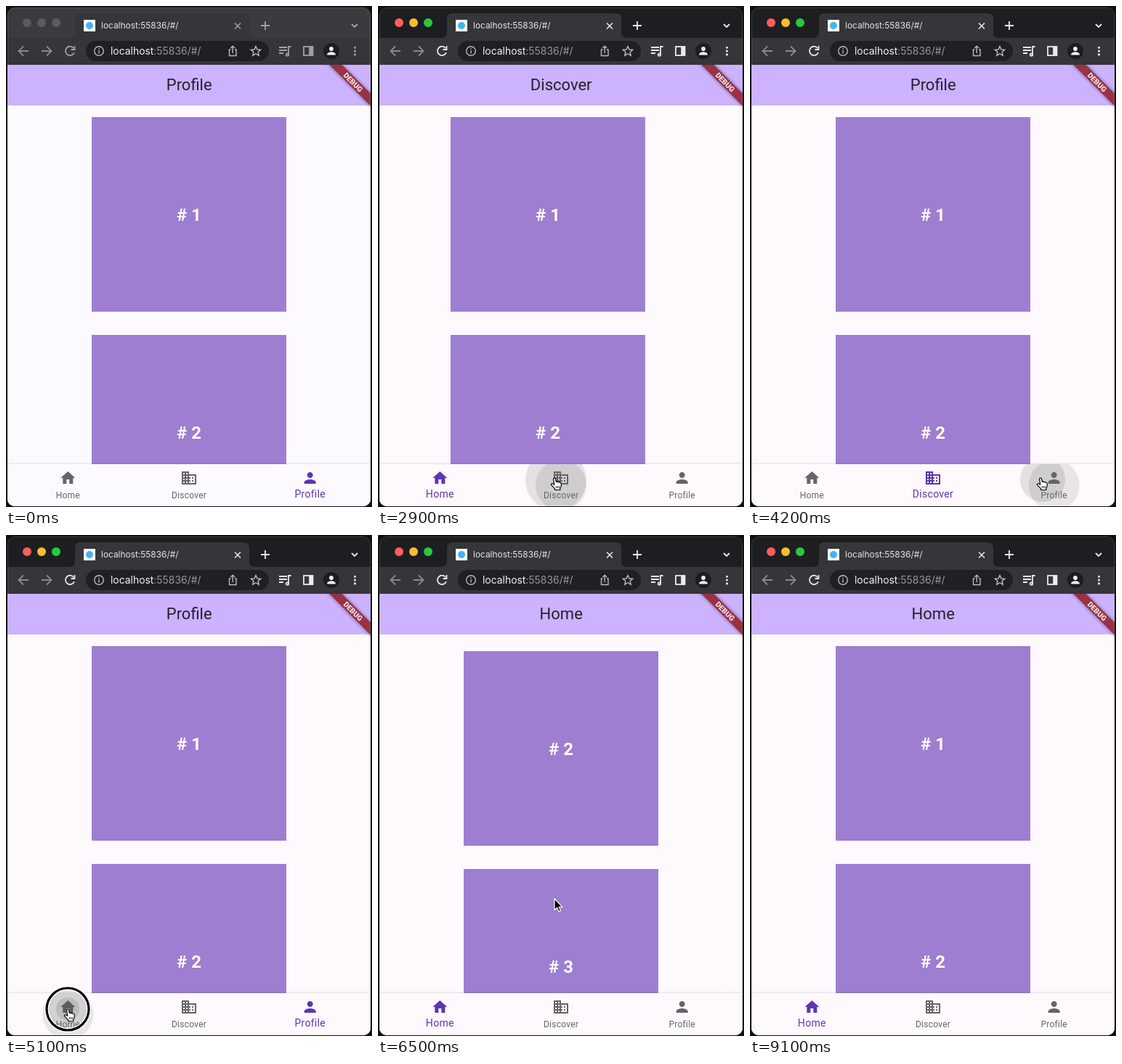
These frames come from a looping animation (504 by 690 pixels, 10 s). An HTML page:

```html
<!DOCTYPE html>
<html lang="en">
<head>
<meta charset="utf-8">
<title>Tabs demo</title>
<style>
html, body { margin: 0; width: 100%; height: 100%; overflow: hidden; background: #101113; }
svg { display: block; width: 504px; height: 690px; }
text { font-family: Roboto, sans-serif; white-space: pre; }
.ui { font-family: Inter, sans-serif; }
.mid { text-anchor: middle; }
.line { fill: none; stroke-width: 1.8; }
</style>
</head>
<body>
<svg viewBox="0 0 504 690" xmlns="http://www.w3.org/2000/svg">
  <defs>
    <clipPath id="win"><rect x="2" y="2" width="500" height="687" rx="10"/></clipPath>
    <clipPath id="body"><rect x="2" y="137" width="500" height="494"/></clipPath>
    <clipPath id="bar"><rect x="2" y="631" width="500" height="58"/></clipPath>
    <clipPath id="app"><rect x="2" y="81" width="500" height="608"/></clipPath>
    <filter id="blur" x="-30%" y="-100%" width="160%" height="300%"><feGaussianBlur stdDeviation="2.6"/></filter>
    <linearGradient id="edge" x1="0" y1="0" x2="0" y2="1">
      <stop offset="0" stop-color="#000" stop-opacity="0"/>
      <stop offset="1" stop-color="#000" stop-opacity=".09"/>
    </linearGradient>
  </defs>
  <g clip-path="url(#win)">
    <rect id="strip" width="504" height="50"/>
    <rect y="44" width="504" height="37" fill="#35353a"/>
    <path d="M87 44q8 0 8-8V18q0-8 8-8H327q8 0 8 8V36q0 8 8 8z" fill="#35353a"/>
    <g id="lights"><circle cx="29" cy="23" r="6"/><circle cx="49" cy="23" r="6"/><circle cx="69" cy="23" r="6"/></g>
    <rect x="107" y="19" width="16" height="16" fill="#fff"/>
    <circle cx="115" cy="27" r="5" fill="#42b4ee"/>
    <text class="ui" x="131" y="31" font-size="11.9" fill="#e6e6e8">localhost:55836/#/</text>
    <rect x="110" y="48" width="252" height="28" rx="14" fill="#1f2024"/>
    <text class="ui" x="144" y="67" font-size="13.9" fill="#f2f2f4">localhost<tspan fill="#97979b">:55836/#/</tspan></text>
    <g class="line" stroke="#89898d">
      <path d="M31 62H18M24 55.5L17.5 62L24 68.5"/>
      <path id="fwd" d="M49 62H62M56 55.5L62.500 62L56 68.5"/>
    </g>
    <g class="line" id="icons">
      <path d="M93 58A6.200 6.200 0 1 0 94 64M94.500 55V60H89.500"/>
      <path d="M315 23.500L323 31.500M323 23.500L315 31.500" stroke-width="1.5"/>
      <path d="M351 27H363M357 21V33"/>
      <path d="M476 25L480 29L484 25"/>
      <path d="M376 57H387M376 61H387M376 65H382M389 67V56H392.500"/>
      <circle cx="387.500" cy="67" r="1.700"/>
      <rect x="410" y="56" width="12.500" height="12"/>
      <path d="M419.700 56V68" stroke-width="5"/>
      <path d="M480.500 57.200V57.300M480.500 62V62.100M480.500 66.800V66.900" stroke-width="3" stroke-linecap="round"/>
    </g>
    <g class="line" stroke="#b9b9bd" style="stroke-width:1.4">
      <circle cx="128" cy="62" r="6.300"/><path d="M128 61V65.500M128 58.300V59.800"/>
      <path d="M309.500 60H307.500V68.500H317V60H315M312.200 65V55.500M309.300 58L312.200 55.200L315.100 58"/>
      <path d="M344 55.500L346 60L350.700 60.400L347.100 63.500L348.200 68.200L344 65.700L339.800 68.200L340.900 63.500L337.300 60.400L342 60Z"/>
    </g>
    <circle cx="448" cy="62" r="11" fill="#1c1d20"/>
    <circle cx="448" cy="59" r="2.900" fill="#f0f0f2"/>
    <path d="M442.300 67.500v-1.300c0-2 3.800-3 5.700-3s5.700 1 5.700 3v1.300z" fill="#f0f0f2"/>

    <g clip-path="url(#app)">
      <rect id="page" y="81" width="504" height="609"/>
      <g clip-path="url(#body)" id="pages"></g>
      <rect x="2" y="81" width="500" height="56" fill="#ccb2ff"/>
      <text id="title" class="mid" x="252.200" y="116" font-size="22" fill="#25212c"></text>
      <rect x="2" y="628" width="500" height="3" fill="url(#edge)"/>
      <rect id="navBg" x="2" y="631" width="500" height="58"/>
      <g clip-path="url(#bar)">
        <circle id="splash" fill="#000"/>
        <g id="hovers"></g>
        <g id="nav"></g>
      </g>
      <g transform="translate(502 81) rotate(45)">
        <rect x="-50" y="28" width="100" height="12" fill="#000" opacity=".5" filter="url(#blur)"/>
        <rect x="-50" y="28" width="100" height="12" fill="#9a3145"/>
        <text class="mid" x="0" y="37.600" font-size="10.2" font-weight="900" fill="#f3e6ea">DEBUG</text>
      </g>
    </g>
    <rect x="2.500" y="2.500" width="499" height="686" rx="9.500" fill="none" stroke="#fff" stroke-opacity=".14"/>
  </g>
  <g id="ring">
    <circle r="29" fill="#000" fill-opacity=".09" stroke="#fff" stroke-width="6"/>
    <circle r="29" fill="none" stroke="#000" stroke-width="3.200"/>
  </g>
  <g id="cursor" stroke-linejoin="round">
    <path id="arrow" d="M0 0V15.500L3.600 12.200L6 17.600L8.500 16.500L6.200 11.300H11Z" fill="#000" stroke="#fff" stroke-width="1.200"/>
    <g id="hand">
      <path d="M-1.500 1Q0-1 1.400 1L2.600 5.500Q4 4.300 5 5.800Q6.400 4.900 7.300 6.500Q9 6 9.300 8L9.200 11.500L7.800 14V16.500H.6V14.800L-4.600 9.400Q-4.600 7.500-2.600 7.800L-.3 9.300Z" fill="#fff" stroke="#000" stroke-width="1.200"/>
      <path d="M2.300 11V14M4.300 11V14M6.300 11V14" stroke="#000" stroke-width=".8"/>
    </g>
  </g>
</svg>
<script>
const LOOP = 10000, SLIDE = 450;
const $ = id => document.getElementById(id);
const names = ['Home', 'Discover', 'Profile'];
const centers = [85.3, 252, 418.7];
const glyphs = [
  'M10 20v-6h4v6h5v-8h3L12 3 2 12h3v8z',
  'M12 7V3H2v18h20V7H12zM6 19H4v-2h2v2zm0-4H4v-2h2v2zm0-4H4V9h2v2zm0-4H4V5h2v2zm4 12H8v-2h2v2zm0-4H8v-2h2v2zm0-4H8V9h2v2zm0-4H8V5h2v2zm10 12h-8v-2h2v-2h-2v-2h2v-2h-2V9h8v10zm-2-8h-2v2h2v-2zm0 4h-2v2h2v-2z',
  'M12 12c2.210 0 4-1.790 4-4s-1.790-4-4-4-4 1.790-4 4 1.790 4 4 4zm0 2c-2.670 0-8 1.340-8 4v2h16v-2c0-2.660-5.330-4-8-4z'
];

// tap: pointer down, slide start, target tab, touch point
const taps = [
  { down: 1890, slide: 1930, to: 0, x: 83.5, y: 653 },
  { down: 2375, slide: 2495, to: 1, x: 245, y: 653 },
  { down: 3812, slide: 3850, to: 2, x: 403, y: 652 },
  { down: 4900, slide: 4950, to: 0, x: 85, y: 653 }
];
// pointer path: time, x, y
const path = [
  [100, 503, 400], [1100, 87, 657], [1500, 84, 653], [1950, 84, 653],
  [2370, 245, 653], [2900, 243, 650], [3250, 243, 650], [3800, 403, 652],
  [4200, 400, 650], [4400, 400, 650], [4880, 85, 653], [5200, 85, 653],
  [5780, 243, 501], [7200, 243, 501], [7500, 244, 501], [8600, 244, 501], [9050, 503, 470]
];
// list scrolling: start, end, from, to
const flicks = [
  [5840, 6500, 0, 293], [6850, 7200, 293, 530],
  [7350, 8100, 530, 285], [8450, 9060, 285, 0]
];

const clamp = (v, a = 0, b = 1) => Math.min(b, Math.max(a, v));
const mix = (a, b, p) => a + (b - a) * p;
const smooth = p => p * p * (3 - 2 * p);
const flickEase = p => 1 - (1 - smooth(p)) ** 2;

function backEase(p) {
  const c = 2.595;
  if (p < .5) return (2 * p) ** 2 * ((c + 1) * 2 * p - c) / 2;
  const x = 2 * p - 2;
  return (x * x * ((c + 1) * x + c) + 2) / 2;
}

function make(tag, parent, attrs) {
  const el = document.createElementNS('http://www.w3.org/2000/svg', tag);
  set(el, attrs);
  parent.append(el);
  return el;
}
function set(el, attrs) {
  for (const k in attrs) el.setAttribute(k, attrs[k]);
}
const show = (el, on) => el.setAttribute('visibility', on ? 'visible' : 'hidden');

const pages = names.map(() => {
  const g = make('g', $('pages'), {});
  for (let i = 0; i < 5; i++) {
    make('rect', g, { x: 118, y: 153 + 300 * i, width: 268, height: 268, fill: '#9d7ed0' });
    make('text', g, { x: 252, y: 295.5 + 300 * i, class: 'mid', 'font-size': 24, 'font-weight': 700, fill: '#fff' })
      .textContent = '# ' + (i + 1);
  }
  return g;
});
const hovers = centers.map(x => make('circle', $('hovers'), { cx: x, cy: 660, r: 35, fill: '#000' }));
const tabs = names.map((name, i) => {
  const g = make('g', $('nav'), {});
  make('path', g, { d: glyphs[i], transform: `translate(${centers[i] - 12} 638)` });
  const label = make('text', g, { x: centers[i], class: 'mid' });
  label.textContent = name;
  return { g, label };
});

function pageAt(t) {
  let page = 2;
  for (const tap of taps) {
    if (t < tap.slide) break;
    page = clamp(mix(page, tap.to, backEase(clamp((t - tap.slide) / SLIDE))), 0, 2);
  }
  return page;
}

function scrollAt(t) {
  let y = 0;
  for (const [a, b, from, to] of flicks)
    if (t >= a) y = mix(from, to, flickEase(clamp((t - a) / (b - a))));
  return y;
}

function pointerAt(t) {
  let i = 0;
  while (i < path.length - 2 && t >= path[i + 1][0]) i++;
  const [a, x0, y0] = path[i], [b, x1, y1] = path[i + 1];
  const p = smooth(clamp((t - a) / (b - a)));
  return [mix(x0, x1, p), mix(y0, y1, p)];
}

// selected amount of a tab, fading over 200 ms after each slide ends
function chosen(i, t) {
  let now = 2, before = 2, since = -1e4;
  for (const tap of taps) {
    const end = tap.slide + SLIDE;
    if (t >= end) { before = now; now = tap.to; since = end; }
  }
  const p = smooth(clamp((t - since) / 200));
  return (now === i ? p : 0) + (before === i ? 1 - p : 0);
}

function drawChrome(t) {
  const active = t >= 1250;
  $('strip').setAttribute('fill', active ? '#1d1e21' : '#3a3a3f');
  const colors = active ? ['#ff5f57', '#febc2e', '#28c840'] : Array(3).fill('#5a5a5f');
  [...$('lights').children].forEach((c, i) => c.setAttribute('fill', colors[i]));
  $('icons').setAttribute('stroke', active ? '#ececee' : '#a2a2a6');
  const paper = active ? '#fef9fd' : '#fdfaff';
  $('page').setAttribute('fill', paper);
  $('navBg').setAttribute('fill', paper);
}

function drawApp(t) {
  const page = pageAt(t);
  $('title').textContent = names[Math.round(page)];
  pages.forEach((g, i) =>
    g.setAttribute('transform', `translate(${(i - page) * 500} ${i ? 0 : -scrollAt(t)})`));
  tabs.forEach(({ g, label }, i) => {
    const k = chosen(i, t);
    const rgb = [[102, 94], [100, 53], [104, 177]].map(([a, b]) => Math.round(mix(a, b, k)));
    g.setAttribute('fill', `rgb(${rgb})`);
    set(label, { y: mix(678, 677, k), 'font-size': mix(12, 14, k), 'letter-spacing': mix(.25, .3, k) });
  });
}

function drawPointer(t) {
  const [x, y] = pointerAt(t);
  const over = t >= 1890 && y > 631;
  hovers.forEach((h, i) =>
    h.setAttribute('opacity', over && Math.abs(x - centers[i]) < 83.3 ? .085 : 0));
  const tap = taps.filter(a => t >= a.down).pop();
  const age = tap ? t - tap.down : 1e4;
  show($('ring'), age < 240);
  if (tap) {
    $('ring').setAttribute('transform', `translate(${tap.x} ${tap.y})`);
    set($('splash'), { cx: tap.x, cy: tap.y, r: Math.min(age * .08, 46),
      opacity: .1 * clamp((720 - age) / 150) });
  } else $('splash').setAttribute('opacity', 0);
  show($('cursor'), t >= 100 && t < 9050);
  $('cursor').setAttribute('transform', `translate(${x} ${y})`);
  $('hand').style.display = over ? '' : 'none';
  $('arrow').style.display = over ? 'none' : '';
}

function draw(t) {
  drawChrome(t);
  drawApp(t);
  drawPointer(t);
}

const start = performance.now();
function tick() {
  draw((performance.now() - start) % LOOP);
  requestAnimationFrame(tick);
}
tick();
</script>
</body>
</html>
```
